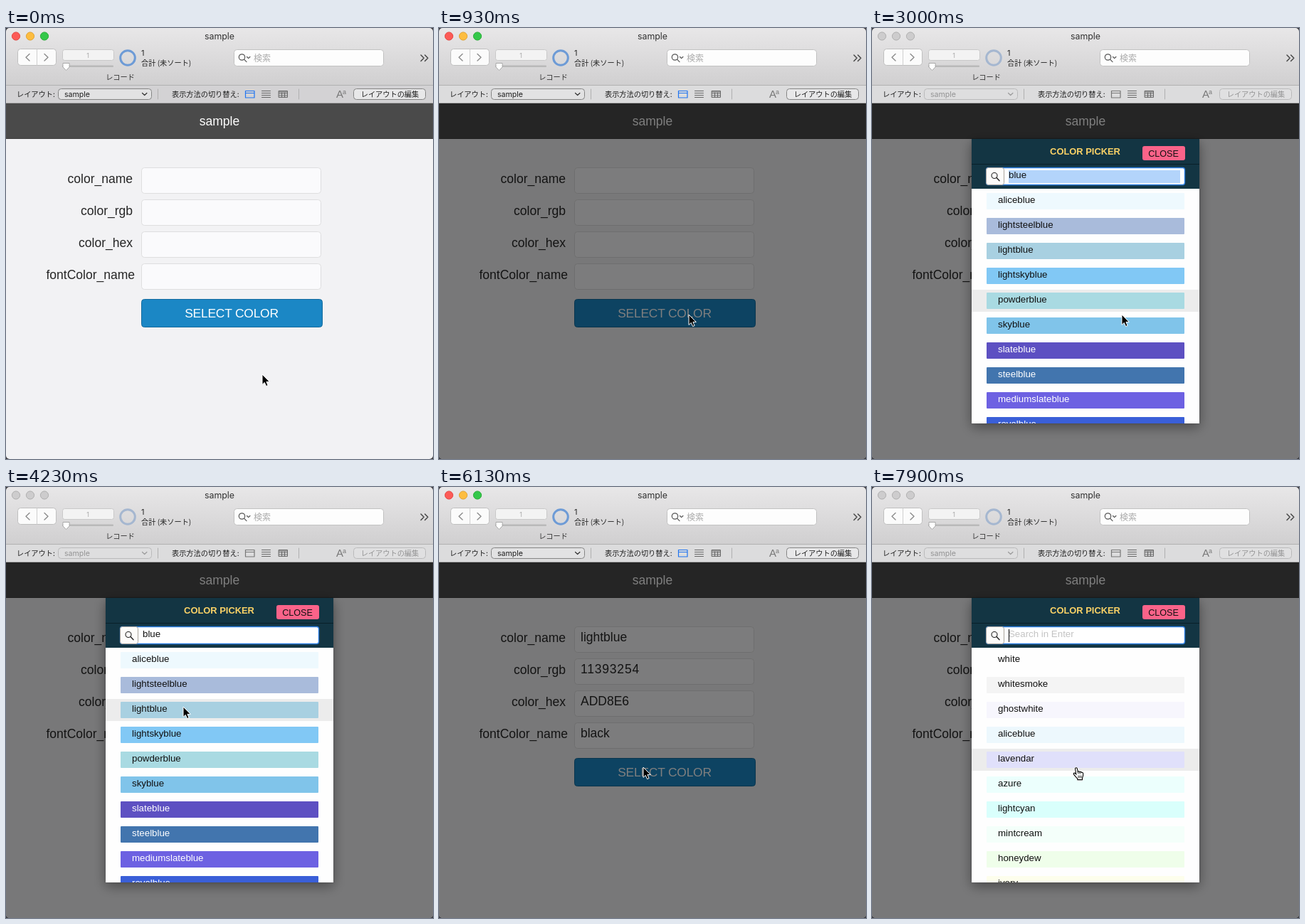
Recreate the animation shown at these times as an HTML page. Size 600 by 606 pixels, loop 8 s.

```html
<!DOCTYPE html>
<html lang="ja">
<head>
<meta charset="utf-8">
<title>sample</title>
<style>
html, body { margin: 0; width: 100%; height: 100%; overflow: hidden; background: #38383c; }
svg { display: block; width: 100%; height: 100%; }
text { font-family: "Liberation Sans", Arial, sans-serif; white-space: pre; }
.ui { font-family: Inter, "Noto Sans CJK JP", "Noto Sans CJK", sans-serif; }
.jp { font-family: "Noto Sans CJK JP", "Noto Sans CJK", sans-serif; font-size: 10.2px; }
.big { font-size: 17.5px; }
.item { font-size: 13.3px; }
.mid { text-anchor: middle; }
.end { text-anchor: end; }
.line { fill: none; stroke-linecap: round; stroke-linejoin: round; }
</style>
</head>
<body>
<svg id="stage" viewBox="0 0 600 606"></svg>
<script>
const LOOP = 8000;
const stage = document.getElementById('stage');

const rect = (x, y, w, h, fill, more = '') =>
  `<rect x="${x}" y="${y}" width="${w}" height="${h}" fill="${fill}" ${more}/>`;
const text = (x, y, content, cls, fill = '#1e1e1e', more = '') =>
  `<text x="${x}" y="${y}" class="${cls}" fill="${fill}" ${more}>${content}</text>`;
const line = (d, stroke, width = 1, more = '') =>
  `<path class="line" d="${d}" stroke="${stroke}" stroke-width="${width}" ${more}/>`;

const lists = {
  all: [['white', '#fefefe'], ['whitesmoke', '#f4f4f4'], ['ghostwhite', '#f7f6fd'],
    ['aliceblue', '#edf8fd'], ['lavendar', '#e0e0fb'], ['azure', '#ecfffd'],
    ['lightcyan', '#d9fffc'], ['mintcream', '#f4fffa'], ['honeydew', '#effeea'], ['ivory', '#fdfeec']],
  blues: [['aliceblue', '#eef9fe'], ['lightsteelblue', '#a9bbdb'], ['lightblue', '#a8d0e1'],
    ['lightskyblue', '#81c8f5'], ['powderblue', '#a9dae2'], ['skyblue', '#80c4ea'],
    ['slateblue', '#5d50c2', 1], ['steelblue', '#4275ae', 1],
    ['mediumslateblue', '#6d61e2', 1], ['royalblue', '#3a5fd8', 1]]
};
const fields = [['color_name', 178, 'lightblue'], ['color_rgb', 178, '11393254', 'letter-spacing=".8"'],
  ['color_hex', 178, 'ADD8E6'], ['fontColor_name', 181, 'black']];

const toolbar = () => `
  ${rect(0, 0, 600, 81, 'url(#chrome)')}
  <g id="lights">${[14, 34, 54].map(x => `<circle cx="${x}" cy="11.5" r="5.6"/>`).join('')}</g>
  ${text(300, 16, 'sample', 'ui mid', '#333', 'font-size="12.4"')}
  ${rect(16.5, 29.5, 54, 23, '#fbfbfb', 'rx="4" stroke="#bfbfbf"')}
  ${line('M43.5 30V52', '#cfcfcf')}
  ${line('M33 36.5L28 41.2L33 46M54 36.5L59 41.2L54 46', '#8c8c8c', 1.4)}
  ${rect(79.5, 30.5, 72, 15, '#f3f3f3', 'rx="3" stroke="#c9c9c9"')}
  ${text(115, 42, '1', 'ui mid', '#aaa', 'font-size="9"')}
  ${rect(79, 52.5, 72, 2.5, '#b9b9b9', 'rx="1"')}
  <path d="M80 49.5H89V55L84.5 59.5L80 55Z" fill="#fff" stroke="#9a9a9a" stroke-width=".8"/>
  <circle id="ring" cx="171" cy="42" r="10.3" fill="none" stroke-width="3"/>
  ${text(190, 39, '1', 'ui', '#222', 'font-size="11"')}
  ${text(190, 53, '合計 (未ソート)', 'jp', '#222')}
  ${text(160.5, 73, 'レコード', 'jp mid', '#333')}
  ${rect(320.5, 30.5, 210, 23, '#fdfdfd', 'rx="4" stroke="#c2c2c2"')}
  <circle cx="331.5" cy="41" r="4.2" fill="none" stroke="#555" stroke-width="1.2"/>
  ${line('M334.6 44.2L338 47.6M338.5 40.5L340.7 42.7L342.9 40.5', '#555', 1.2)}
  ${text(348, 46.5, '検索', 'jp', '#aaa', 'style="font-size:12px"')}
  ${line('M583 38L587.2 42.3L583 46.6M588.6 38L592.8 42.3L588.6 46.6', '#444', 1.4)}
  <rect id="bar" y="81" width="600" height="25"/>
  ${line('M0 80.5H600', '#b1b1b1')}${line('M0 105.5H600', '#a9a9aa')}
  ${text(15, 97, 'レイアウト:', 'jp')}
  <g id="controls">
    ${rect(73.5, 85.5, 131, 15, '#e2e2e3', 'rx="4" stroke="#858585"')}
    ${text(82, 97, 'sample', 'ui', '#1e1e1e', 'font-size="10.6"')}
    ${line('M191.5 91.5L194.7 94.5L197.9 91.5', '#333', 1.2)}
    ${rect(488.5, 85.5, 101, 15, '#e8e8e9', 'rx="4" stroke="#858585"')}
    ${text(539.5, 97, 'レイアウトの編集', 'jp mid')}
  </g>
  ${line('M213.5 86V100M411.5 86V100', '#b0b0b0')}
  ${text(233, 97, '表示方法の切り替え:', 'jp')}
  <g id="form">${line('M336.5 88.5H349V98H336.5ZM336.5 91.5H349', 'currentColor', 1.2)}</g>
  ${line('M359.5 88.5H371.5M359.5 91.5H371.5M359.5 94.5H371.5M359.5 97.5H371.5', '#666')}
  ${line('M383.5 88.5H395.5V97.5H383.5ZM383.5 90H395.5M383.5 92H395.5M383.5 95H395.5M387.5 91V97M391.5 91V97', '#666')}
  ${text(464, 98, 'A', '', '#777', 'font-size="15"')}${text(473, 93, 'a', '', '#777', 'font-size="9"')}`;

const form = () => `
  ${rect(0, 106, 600, 500, '#f2f2f4')}
  ${rect(0, 106, 600, 50, '#4a4a4a')}${rect(0, 155, 600, 1, '#3d3d3d')}
  ${text(300, 137, 'sample', 'big mid', '#fff')}
  ${fields.map(([name, right, value, more], i) => `
    ${rect(190.5, 196.5 + 45 * i, 252, 36, '#fafafc', 'rx="4" stroke="#dededf" class="field"')}
    ${text(right, 218 + 45 * i, name, 'big end', '#262626')}
    ${text(199, 217 + 45 * i, value, 'big value', '#262626', more)}`).join('')}
  ${rect(190.5, 381.5, 254, 39, '#1b87c5', 'rx="4" stroke="#146b9e"')}
  ${text(317, 407, 'SELECT COLOR', 'mid', '#fff', 'font-size="17.4" letter-spacing="-.2"')}`;

const rows = key => `<g id="${key}">${lists[key].map(([name, fill, light], i) =>
  rect(161, 232 + 35 * i, 278, 23, fill, 'rx="1"') +
  text(177, 246 + 35 * i, name, 'item', light ? '#fff' : '#111')).join('')}</g>`;

const picker = () => `
  <g id="picker">
    ${rect(140, 156, 320, 400, '#fefefe', 'filter="url(#shadow)"')}
    <g clip-path="url(#panel)">
      ${rect(140, 0, 320, 31, '#ececec', 'id="hover"')}
      ${rows('all')}${rows('blues')}
      ${rect(140, 156, 320, 70, '#e1e1e4')}
      <g id="head">
        ${rect(140, 156, 320, 70, '#133543')}${rect(140, 191, 320, 1, '#091f29')}
        ${text(299.5, 178, 'COLOR PICKER', 'mid', '#fbd266', 'font-size="12.9" font-weight="700"')}
        ${rect(380, 166, 60, 20, '#fb6389', 'rx="3"')}
        ${text(409.5, 180.5, 'CLOSE', 'mid', '#111', 'font-size="12.6"')}
        ${rect(160.5, 196.5, 279, 24, '#fff', 'rx="3" stroke="#2b7de0" stroke-width="1.4"')}
        ${rect(160.5, 196.5, 25, 24, '#fdfcfa', 'rx="3" stroke="#a9a49c"')}
        <circle cx="172" cy="207.5" r="4" fill="none" stroke="#222" stroke-width="1.1"/>
        ${line('M175 210.6L179 214.8', '#222', 1.4)}
        ${rect(192, 200, 241, 18, '#b3d4fb', 'id="selection"')}
        <text id="query" class="item" x="192" y="211"></text>
        ${rect(192, 200, 1, 18, '#000', 'id="caret"')}
      </g>
    </g>
  </g>`;

const HAND = 'M-1.5 2C-1.5 .4 1 .4 1.3 1.8L2.3 6.4C2.8 5.4 4.6 5.6 4.9 6.8C5.6 6 7 6.2 7.3 7.5C8.2 6.9 9.6 7.4 9.7 8.8C10 12 9.2 13.6 8.5 15.2V17.6H1.8V16.2C0 14.2-2 12.2-3.6 9.9C-4.4 8.5-2.6 7.6-1.6 8.5L-.2 9.8Z';
const pointers = () => `
  <g id="pointer">
    <path id="arrow" d="M0 0V14.4L3.3 11.4L5.6 16.6L8.1 15.5L5.9 10.4H10.3Z" fill="#000" stroke="#fff" stroke-width="1" stroke-linejoin="round"/>
    <g id="hand">
      <path d="${HAND}" fill="#fff" stroke="#fff" stroke-width="2.4"/>
      <path d="${HAND}" fill="#fff" stroke="#000" stroke-width="1.1"/>
      ${line('M2.4 6.4L2.9 9M5 7L5.3 9.2M3 12V15M5 12V15M7 12V15', '#000', .8)}
    </g>
    <g id="ibeam">${line('M-3-8L0-7L3-8M0-7V7M-3 8L0 7L3 8', '#222', 1.2)}</g>
  </g>`;

stage.innerHTML = `
  <defs>
    <linearGradient id="chrome" x2="0" y2="1"><stop stop-color="#e8e7e8"/><stop offset="1" stop-color="#d0cfd0"/></linearGradient>
    <clipPath id="window"><rect width="600" height="606" rx="5"/></clipPath>
    <clipPath id="panel"><rect x="140" y="156" width="320" height="400"/></clipPath>
    <filter id="shadow" x="-20%" y="-20%" width="140%" height="140%">
      <feDropShadow dx="0" dy="5" stdDeviation="9" flood-opacity=".35"/>
      <feDropShadow dx="0" dy="0" stdDeviation="1.5" flood-opacity=".2"/>
    </filter>
  </defs>
  <g clip-path="url(#window)">
    ${toolbar()}${form()}
    ${rect(0, 106, 600, 500, '#000', 'id="dim" opacity=".5"')}
    ${picker()}
  </g>
  ${pointers()}`;

const el = Object.fromEntries([...stage.querySelectorAll('[id]')].map(n => [n.id, n]));
const lamps = [...el.lights.children];
const inputs = [...stage.querySelectorAll('.field')];
const values = [...stage.querySelectorAll('.value')];
const show = (node, on) => node.setAttribute('display', on ? 'inline' : 'none');
const paint = (node, fill, stroke) => {
  node.setAttribute('fill', fill);
  node.setAttribute('stroke', stroke);
};

// Pointer moves: start, end, destination
const moves = [[30, 400, 351, 403], [3000, 3760, 249, 309], [4960, 5230, 287, 394]];
function pointerAt(t) {
  let x = 360, y = 487;
  for (const [start, end, toX, toY] of moves) {
    const p = Math.min(1, Math.max(0, (t - start) / (end - start)));
    const eased = p * p * (3 - 2 * p);
    x += (toX - x) * eased;
    y += (toY - y) * eased;
  }
  return { x, y };
}

const typed = t => t < 1930 || t >= 4360 ? '' :
  'blue'.slice(0, t < 2030 ? 1 : t < 2160 ? 2 : t < 2300 ? 3 : 4);

function render(t) {
  const second = t >= 6060;
  const since = second ? t - 6060 : t >= 860 && t < 4360 ? t - 860 : -1;
  const open = since >= 200;
  const ready = since >= (second ? 370 : 340);
  const dimmed = since >= 0;
  const { x, y } = pointerAt(t);

  lamps.forEach((lamp, i) => open ? paint(lamp, '#cdcccd', '#adadad')
    : paint(lamp, ['#fc5b57', '#fdbd40', '#34c84a'][i], ['#e24541', '#dfa032', '#27aa35'][i]));
  el.ring.setAttribute('stroke', open ? '#a5b7d0' : '#6d9bd6');
  el.bar.setAttribute('fill', dimmed ? '#dcdcdd' : '#d3d2d4');
  el.controls.setAttribute('opacity', ready ? .38 : 1);
  el.form.setAttribute('color', open ? '#777' : '#1f74f0');
  show(el.dim, dimmed);

  const over = !dimmed && x > 190 && x < 443 ? inputs.findIndex((_, i) => y > 196 + 45 * i && y < 233 + 45 * i) : -1;
  inputs.forEach((input, i) => paint(input, i === over ? '#fff' : '#fafafc', i === over ? '#cfcfd2' : '#dededf'));
  values.forEach(value => show(value, t >= 4360));

  const query = typed(t);
  const filtered = t >= 2400 && t < 4360;
  const selected = t >= 2460 && t < 4200;
  show(el.picker, open);
  show(el.head, since >= 270);
  show(el.all, since >= 240 && !filtered);
  show(el.blues, filtered);
  show(el.hover, ready);
  el.hover.setAttribute('y', 228 + 35 * Math.floor((y - 228) / 35));
  show(el.selection, selected);
  el.query.textContent = query || 'Search in Enter';
  el.query.setAttribute('fill', query ? '#111' : '#c3c3c3');
  const blink = second ? t >= 6630 && Math.floor((t - 6630) / 500) % 2 === 0 : t >= 1500 && t < 2460;
  show(el.caret, blink);
  el.caret.setAttribute('x', 192 + [0, 7, 10, 18, 25][query.length]);

  const onButton = x > 190 && x < 445 && y > 381 && y < 421;
  const hand = (onButton && since < 70 && !open) || t >= 7900;
  show(el.hand, hand);
  show(el.ibeam, over >= 0);
  show(el.arrow, !hand && over < 0);
  el.pointer.setAttribute('transform', `translate(${x} ${y})`);
}

const began = performance.now();
function tick() {
  render((performance.now() - began) % LOOP);
  requestAnimationFrame(tick);
}
tick();
</script>
</body>
</html>
```
